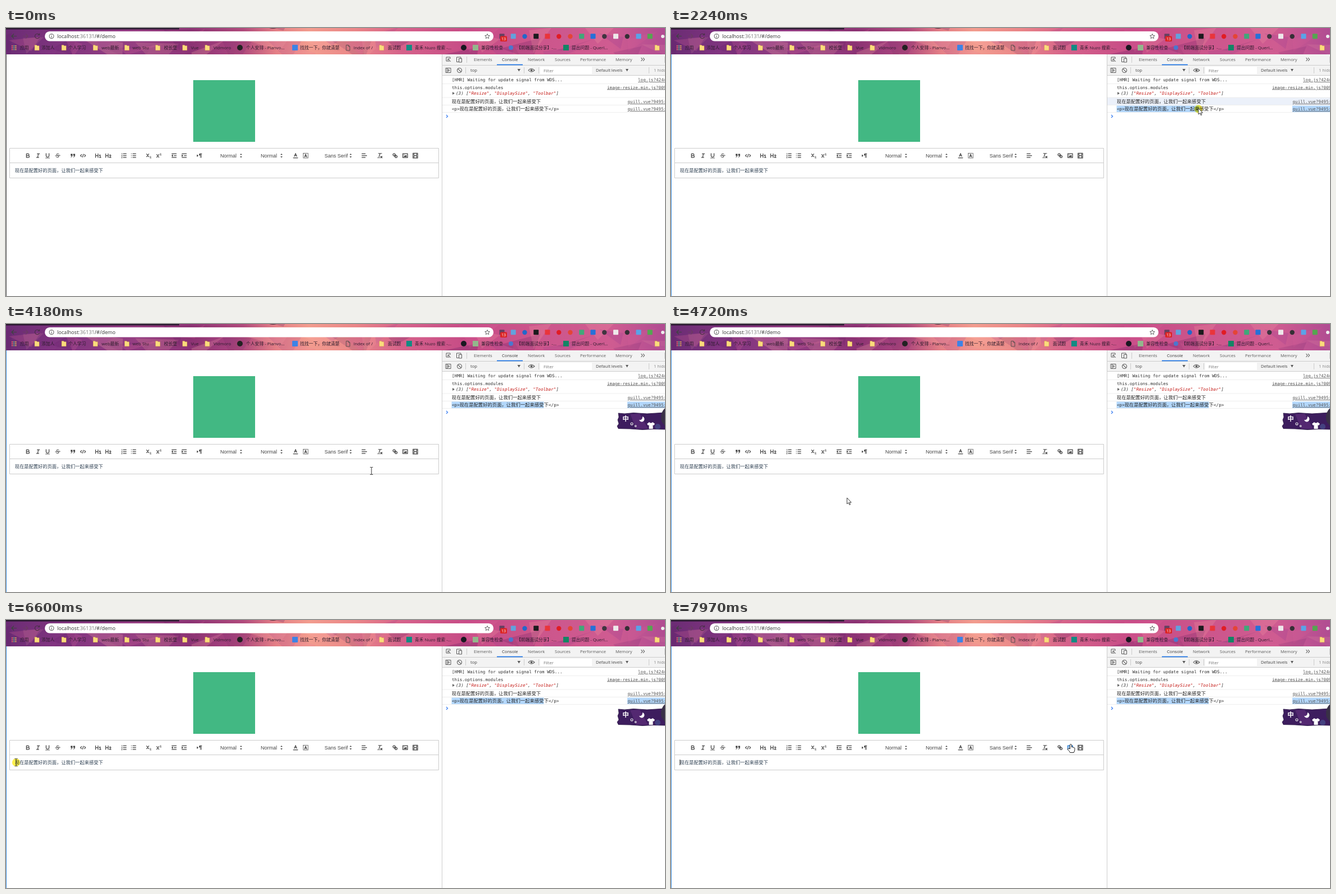
Animation, 1172 px wide and 478 px high, one loop 8 s. Source, as an HTML page:

```html
<!DOCTYPE html>
<html lang="zh">
<head>
<meta charset="utf-8">
<style>
html, body { margin: 0; width: 100%; height: 100%; overflow: hidden; background: #fff; }
svg { display: block; }
text { white-space: pre; }
.ui { font-family: "Open Sans", "Noto Sans CJK SC", "Noto Sans CJK", sans-serif; }
.mono { font-family: "DejaVu Sans Mono", monospace; }
.cjk { font-family: "Noto Sans CJK SC", "Noto Sans CJK", sans-serif; }
.arial { font-family: "Liberation Sans", sans-serif; }
.icon { fill: none; stroke: #444; stroke-width: 1.9; stroke-linejoin: round; stroke-linecap: round; }
.icon .f { fill: #444; stroke: none; }
.icon.hot { stroke: #06c; }
.icon.hot .f { fill: #06c; }
</style>
</head>
<body>
<svg id="stage" width="1172" height="478" viewBox="0 0 1172 478"></svg>
<script>
const stage = document.getElementById('stage');
let out = '';
const add = s => out += s;
const rect = (x, y, w, h, fill, more = '') =>
  add(`<rect x="${x}" y="${y}" width="${w}" height="${h}" fill="${fill}" ${more}/>`);
const dot = (x, y, r, fill) => add(`<circle cx="${x}" cy="${y}" r="${r}" fill="${fill}"/>`);
const path = (d, stroke, width = 1, fill = 'none', more = '') =>
  add(`<path d="${d}" stroke="${stroke}" stroke-width="${width}" fill="${fill}" ${more}/>`);
const esc = s => s.replace(/&/g, '&amp;').replace(/</g, '&lt;');
const text = (x, y, s, size, fill, cls = 'ui', more = '') =>
  add(`<text x="${x}" y="${y}" font-size="${size}" fill="${fill}" class="${cls}" ${more}>${esc(s)}</text>`);
const phrase = '现在是配置好的页面，让我们一起来感受下';

function browserBar() {
  const stops = [[0, '#6b2c74'], [.08, '#7f347f'], [.2, '#963f82'], [.28, '#8b3273'], [.36, '#b04a7c'],
    [.41, '#e47f86'], [.46, '#f29c8e'], [.53, '#ea8688'], [.6, '#d5628a'], [.7, '#c64b86'], [.8, '#cc558b'],
    [.92, '#cf5c91'], [1, '#b04c92']];
  add('<defs><linearGradient id="theme">' +
    stops.map(([o, c]) => `<stop offset="${o}" stop-color="${c}"/>`).join('') + '</linearGradient></defs>');
  rect(0, 0, 1172, 47, 'url(#theme)');
  let seed = 11;
  const rnd = () => (seed = seed * 16807 % 2147483647) / 2147483647;
  const tints = ['#5a1a60', '#e0679b', '#ffb0a8', '#9a3a90'];
  add('<svg width="1172" height="47">');
  for (let i = 0; i < 48; i++) {
    const x = i * 25 - 20, w = 30 + rnd() * 50, y = rnd() * 47;
    path(`M${x} ${y}l${w} ${rnd() * 40 - 25}l${-w * rnd()} ${20 + rnd() * 25}z`, 'none', 0,
      tints[i % 4], `opacity="${.1 + rnd() * .16}"`);
  }
  add('</svg>');
  rect(0, 0, 308, 2.5, '#2a1930');
  path('M468 0Q475 2 482 0Z', 'none', 0, '#3b2636');

  path('M19 14.5H10M14 10.5L10 14.5L14 18.5', '#3d443f', 1.2);
  path('M30 14.5H39M35 10.5L39 14.5L35 18.5', '#6c3b62', 1.2);
  path('M59 12A4.2 4.2 0 1 0 59.5 16M59.5 9.5V12.5H56.5', '#4a3048', 1.2);
  rect(69, 6, 798, 17.5, '#fff', 'rx="8.7"');
  add('<circle cx="81" cy="14.7" r="4" fill="none" stroke="#555"/>');
  path('M81 14V17M81 12V13', '#555');
  add('<text x="91" y="18" font-size="9.1" class="ui" fill="#333">localhost<tspan fill="#777">:36131</tspan>/#/demo</text>');
  path('M856 10.5l1.3 2.8 3 .3-2.3 2 .7 3-2.7-1.6-2.7 1.6.7-3-2.3-2 3-.3z', '#555', .9);

  const extensions = ['#654060', '#62a2dd', '#2467ca', '#1b1b1d', '#e9353b', '#e11c24', '#e44536', '#40a879',
    '#2671d8', '#403540', '#eee8ea', '#352f35', '#5aa3e8', '#55a550'];
  const round = [2, 5, 6, 9, 11];
  extensions.forEach((c, i) => round.includes(i) ? dot(882 + i * 20.25, 15, 4.2, c)
    : rect(877.5 + i * 20.25, 10.3, 9, 9, c, 'rx="1"'));
  rect(879, 14.5, 12, 9.5, '#dc2424', 'rx="1.5"');
  text(881, 22, '13', 7, '#fff');
  dot(1168, 15, 3, '#eee');

  const ink = '#2c1c2c';
  for (let i = 0; i < 9; i++)
    rect(10 + i % 3 * 3.2, 31 + (i / 3 | 0) * 3.2, 2, 2, ['#e76663', '#65b68d', '#e1b756'][i % 3]);
  [[25, '应用'], [63, '添加人'], [111, '个人学习'], [170, 'web最新'], [225, 'web Stu'], [281, '校长堡'],
    [329, 'Vue'], [369, 'Vidmoro'], [427, '个人安排 - Planvo...'], [523, '找找一下，你就清楚'], [618, 'Index of /'],
    [679, '面试题'], [727, '青禾 Nuzo 搜索 -...'], [845, '兼容性检查'], [908, '【前端面试分享】-...'],
    [1006, '提出问题 - Querl...']].forEach(([x, s]) => text(x, 38, s, 7.8, ink));
  [51, 99, 155, 211, 266, 314, 354, 664, 1154].forEach(x =>
    path(`M${x} 30.5h3.5l1 1.3h3.5v8h-8z`, '#d7aa42', .4, '#fbdc7c'));
  dot(416, 35, 5, '#222');
  rect(509, 30, 10, 10, '#3e83e5', 'rx="1"');
  path('M605 30.5h4l2.5 2.5v7h-6.5zM609 30.5v2.5h2.5', '#444', .8);
  rect(712, 30, 10, 10, '#128b83');
  dot(814, 35, 5, '#191820');
  rect(830, 30, 10, 10, '#93b78c');
  dot(898, 35, 4, '#4b77ce');
  rect(991, 30, 10, 10, '#138565');
}

const lines = (from, ys) => ys.map(y => `M${from} ${y}H15`).join('');
const fill = d => `<path class="f" d="${d}"/>`;
const line = (d, w = 1.9) => `<path d="${d}" stroke-width="${w}"/>`;
const rows = line(lines(7, [4, 9, 14]));
const spinner = fill('M6 11H12L9 14.5ZM6 7H12L9 3.5Z');

const icons = [
  [39, line('M5 4H9.5A2.5 2.5 0 0 1 9.5 9H5ZM5 9H10.5A2.5 2.5 0 0 1 10.5 14H5Z')],
  [57, line('M7 4H13M5 14H11M8 14L10 4')],
  [74, line('M5 3V9a4 4 0 0 0 8 0V3') + fill('M3 15H15V16.3H3Z')],
  [92, line('M12.5 5Q9 2.7 6.3 4.6Q5 7.5 9 8.8Q13 10.2 11.8 12.6Q9 15.3 5.3 12.8M2.5 9.5L15.5 8.5', 1.5)],
  [119, fill('M3 4H8V8.5Q8 12.5 4 14L3.3 12.5Q5.7 11 5.8 9H3ZM10 4H15V8.5Q15 12.5 11 14L10.3 12.5Q12.7 11 12.8 9H10Z')],
  [137, line('M5 6L2 9L5 12M13 6L16 9L13 12M10 5L8 13')],
  [164, line('M2 4V14M8.5 4V14M2 9H8.5M12 8.5L14.5 7V14M12.5 14H16.5')],
  [182, line('M2 4V14M8.5 4V14M2 9H8.5M12 8.5Q14 6 16 8.3Q16 10 12 14H16.5')],
  [210, rows + line('M2.5 3L3.5 2.5V5.5M2 8H4L2.5 10.5H4.2M2 13H4L3 14L4 15.5H2', 1)],
  [227, rows + line('M3 4H3.1M3 9H3.1M3 14H3.1')],
  [254, line('M3 4.5L9 12M9 4.5L3 12') + line('M12 11.5Q14.5 10 15 12L12 15.5H15.5', 1.2)],
  [272, line('M3 6L9 13.5M9 6L3 13.5') + line('M12 3.5Q14.5 2 15 4L12 7.5H15.5', 1.2)],
  [299, line(lines(3, [4, 14]) + 'M9 9H15M5 7V11L3 9Z')],
  [317, line(lines(3, [4, 14]) + 'M9 9H15M3 7V11L5 9Z')],
  [344, line('M3 7V11L5 9Z') + fill('M16 3H11a3 3 0 0 0 0 6V15H12.4V4.5H13.5V15H14.9V4.5H16Z')],
  [418, spinner],
  [490, spinner],
  [515, line('M5.5 11L9 3L12.5 11M6.4 9H11.6', 1.7) + line('M3 15H15')],
  [533, '<rect x="2.5" y="2.5" width="13" height="13" stroke-width="1.4" stroke-dasharray="1 1.6"/>' + line('M6 13L9 5L12 13M7 10.5H11', 1.7)],
  [613, spinner],
  [637, line('M3 4H12M3 9H16M3 14H12')],
  [665, line('M5 3H14M6.5 12.5L9.5 3M11 11L15 15M15 11L11 15') + fill('M2 14H9V15.3H2Z')],
  [692, line('M7 7L11 11M8.9 4.6a3.5 3.5 0 0 1 .4 4.7A3.5 3.5 0 0 1 4.6 8.9C3.2 7.5 2 6.4 4.2 4.2S7.5 3.2 8.9 4.6ZM13.4 9.1a3.5 3.5 0 0 0-4.7-.4 3.5 3.5 0 0 0 .4 4.7c1.4 1.4 2.5 2.5 4.7.4S14.8 10.5 13.4 9.1Z')],
  [710, line('M2.5 3.5H15.5V14.5H2.5Z') + fill('M5 12.5V11L7 9L8 10L11 7L13 9V12.5ZM5 6H7V8H5Z'), 'id="picture"'],
  [728, line('M2.5 2.5H15.5V15.5H2.5ZM5.5 3V15M12.5 3V15M5.5 9H12.5', 1.7) + line('M3 6H5M3 12H5M13 6H15M13 12H15', 1.2)]
];

function page() {
  rect(0, 47, 775, 431, '#fff');
  add('<rect id="edge" x="0" y="47" width="1" height="431"/>');
  rect(333, 93, 110, 110, '#42b883');
  path('M6.5 214.5H769.5V267.5H6.5ZM6.5 240.5H769.5', '#ccc');
  icons.forEach(([x, body, more = '']) =>
    add(`<g class="icon" ${more} transform="translate(${x - 5.9} 221.8) scale(.65)">${body}</g>`));
  [[381, 'Normal'], [453, 'Normal'], [566.5, 'Sans Serif']].forEach(([x, s]) => text(x, 231, s, 9, '#444', 'arial'));
  text(15.8, 257, phrase, 8.25, '#2c3e50', 'cjk');
  rect(15.5, 249, 1, 10, '#111', 'id="caret"');
}

function devtools() {
  const gray = '#5a5a5a', rule = '#ccc';
  rect(775, 47, 397, 431, '#fff');
  rect(775, 47, 397, 37.5, '#f3f3f3');
  path('M775 66.5H1172M775 84.5H1172M775.5 47V478', rule);
  path('M819.5 51V62M817.5 70V81M921.5 70V81M947.5 70V81M1143.5 70V81M1171.5 51V62', rule);
  path('M789 59H783V52H790V55M786 55L791 60M786 58V55H789', gray);
  path('M801.5 60.5V52H809V54M805.5 54.5H810.5V61H805.5ZM801.5 60.5H805', gray);
  [[832, 'Elements'], [882, 'Console'], [928, 'Network'], [976, 'Sources'], [1021, 'Performance'], [1084, 'Memory']]
    .forEach(([x, s]) => text(x, 59, s, 7.6, s == 'Console' ? '#333' : gray));
  path('M1129.5 53L1132 56L1129.5 59M1133 53L1135.5 56L1133 59', gray, 1.1);
  rect(873, 64.7, 46, 1.6, '#1a73e8');

  path('M782 71.5H791V79.5H782ZM784.5 71.5V79.5M786.5 73.5L789 75.5L786.5 77.5Z', gray);
  path('M810.5 75.5a4 4 0 1 1-8 0a4 4 0 1 1 8 0M803.7 72.7L809.3 78.3', gray, 1.1);
  text(826, 78, 'top', 7.6, '#444');
  path('M909.5 73H915L912.2 77.5ZM1102 73H1107L1104.5 77.5Z', 'none', 0, gray);
  path('M929 75.5Q934 69.5 940 75.5Q934 81 929 75.5Z', gray, 1.1);
  dot(934.5, 75.3, 1.9, gray);
  rect(950, 69, 92, 13, '#fff');
  text(956, 78.5, 'Filter', 7.6, '#777');
  text(1049, 78, 'Default levels', 7.6, '#444');
  text(1152, 78, '1 hidden', 7.6, '#888');

  rect(776, 124, 396, 13.5, '#ecf1fa', 'id="focus"');
  add('<g id="selection">');
  rect(1105, 138.5, 67, 11.5, '#b3d7fb');
  rect(792.5, 138.5, 0, 11.5, '#b3d7fb', 'id="range"');
  add('</g>');
  path('M776 99.5H1172M776 124H1172M776 137.5H1172M776 150.5H1172', '#eee');
  const mono = (x, y, s, fill = '#303030', more = '') => text(x, y, s, 7.6, fill, 'mono', more);
  mono(793, 95, '[HMR] Waiting for update signal from WDS...');
  mono(793, 108.5, 'this.options.modules');
  path('M794 114L798 116.5L794 119Z', 'none', 0, '#666');
  add('<text x="800" y="119.3" font-size="7.6" class="mono" font-style="italic" fill="#333">(3) [' +
    ['Resize', 'DisplaySize', 'Toolbar'].map(s => `<tspan fill="#c41a16">"${s}"</tspan>`).join(', ') + ']</text>');
  text(792.8, 134, phrase, 8.33, '#222', 'cjk');
  mono(793, 147, '<p>');
  text(806.5, 147.3, phrase, 8.33, '#222', 'cjk');
  mono(965, 147, '</p>');
  [[1124, 95, 'log.js?4244:'], [1069, 108.5, 'image-resize.min.js?0096'], [1105.5, 134, 'quill.vue?9495:'],
    [1105.5, 147, 'quill.vue?9495:']].forEach(([x, y, s]) => mono(x, y, s, '#545454', 'text-decoration="underline"'));
  path('M783 155L785.5 157.5L783 160', '#367cf1', 1.2);
}

function inputBar() {
  add('<g id="ime">');
  path('M1089 159L1100 160L1116 158.5L1140 160L1172 158V188L1150 187.5L1132 188.5L1110 187L1089 186.5L1087 182L1090 178L1088 171L1090 166Z',
    '#281542', .8, '#3d1d5e');
  path('M1110 161L1127 160L1142 187L1121 187Z', 'none', 0, '#63317f', 'opacity=".6"');
  text(1096.3, 172.5, '中', 11.5, '#fff', 'cjk', 'font-weight="bold"');
  path('M1132 165A4.8 4.8 0 1 1 1126 171Q1132 172 1132 165Z', 'none', 0, '#fff');
  path('M1115 178a2 2 0 1 1-4 0a2 2 0 1 1 4 0M1121 182a1.3 1.3 0 1 1-2.6 0a1.3 1.3 0 1 1 2.6 0', '#eee', 1.1);
  path('M1144 175Q1147 178 1150 175L1154 178L1152 181L1150.5 180V187H1143.5V180L1142 181L1140 178Z', 'none', 0, '#fff');
  dot(1159, 183, 5, '#444180');
  path('M1172 150Q1162 160 1166 174L1172 182Z', 'none', 0, '#393046');
  add('</g>');
}

function pointer() {
  add('<g id="mouse"><circle id="press" r="7.2" fill="#fff04f" style="mix-blend-mode:multiply"/>');
  path('M0 0V11L2.6 8.7L4.4 12.6L6 11.9L4.3 8.2H7.6Z', '#222', .9, '#fff', 'id="arrow"');
  path('M-2.5-6.5H-.7L0-6L.7-6.5H2.5M0-6V6M-2.5 6.5H-.7L0 6L.7 6.5H2.5', '#333', 1, 'none', 'id="beam"');
  path('M-1.4 9V1.3Q0-.6 1.4 1.3V5.8Q3 4.7 3.6 6.2Q5.2 5.2 5.6 7Q7 6.4 7.1 8.3Q7.3 12 5.3 15.5H-1.2Q-2.5 12.5-5.4 10Q-5.3 7.3-3.2 8Z',
    '#222', 1, '#fff', 'id="hand"');
  add('</g>');
}

browserBar();
page();
devtools();
inputBar();
pointer();
stage.innerHTML = out;

const $ = id => document.getElementById(id);
const show = (id, on) => $(id).style.display = on ? '' : 'none';

// time, x, y
const route = [[300, 1010, 468], [1080, 972, 151], [1320, 972, 151], [1700, 990, 132], [1860, 990, 132],
  [2080, 958, 143], [2240, 938, 143], [2470, 914, 144], [2700, 914, 144], [2860, 957, 145], [3160, 957, 145],
  [3410, 564, 307], [3500, 564, 307], [3650, 549, 304], [3950, 705, 253], [4180, 650, 262], [4700, 313, 310],
  [4800, 313, 310], [4960, 176, 295], [5100, 216, 262], [5400, 190, 254], [5820, 64, 254], [6150, 18, 254],
  [6750, 18, 254], [7900, 711, 221]];

function position(t) {
  const i = route.findIndex(k => k[0] > t);
  if (i < 1) return route[i ? route.length - 1 : 0].slice(1);
  const [a, b] = [route[i - 1], route[i]];
  const u = (t - a[0]) / (b[0] - a[0]), e = u * u * (3 - 2 * u);
  return [a[1] + (b[1] - a[1]) * e, a[2] + (b[2] - a[2]) * e];
}

function draw(t) {
  const within = (a, b) => t >= a && t < b;
  const [x, y] = position(t);
  const beam = x > 6 && x < 769 && y > 241 && y < 267;
  const hand = x > 685 && x < 735 && y > 216 && y < 240;
  show('mouse', t >= 300 && !within(4030, 4180));
  $('mouse').setAttribute('transform', `translate(${x} ${y})`);
  show('beam', beam);
  show('hand', hand);
  show('arrow', !beam && !hand);
  show('press', within(1150, 1330) || within(1860, 3160) || within(6510, 6670));
  $('press').setAttribute('cy', beam ? 0 : 1.5);

  $('edge').setAttribute('fill', t < 1150 ? '#555' : '#3b8ee0');
  show('focus', within(1860, 4180));
  show('selection', t >= 1980);
  const chars = t < 3160 ? Math.min(19, Math.round((x - 806.5) / 8.33)) : 18;
  $('range').setAttribute('width', Math.max(0, 14 + chars * 8.33));
  show('ime', t >= 4180);
  show('caret', t >= 6670 && (t - 6670) % 1000 < 500);
  $('picture').classList.toggle('hot', hand && x > 701 && x < 719);
}

function tick(now) {
  draw(now % 8000);
  requestAnimationFrame(tick);
}
draw(0);
requestAnimationFrame(tick);
</script>
</body>
</html>
```
